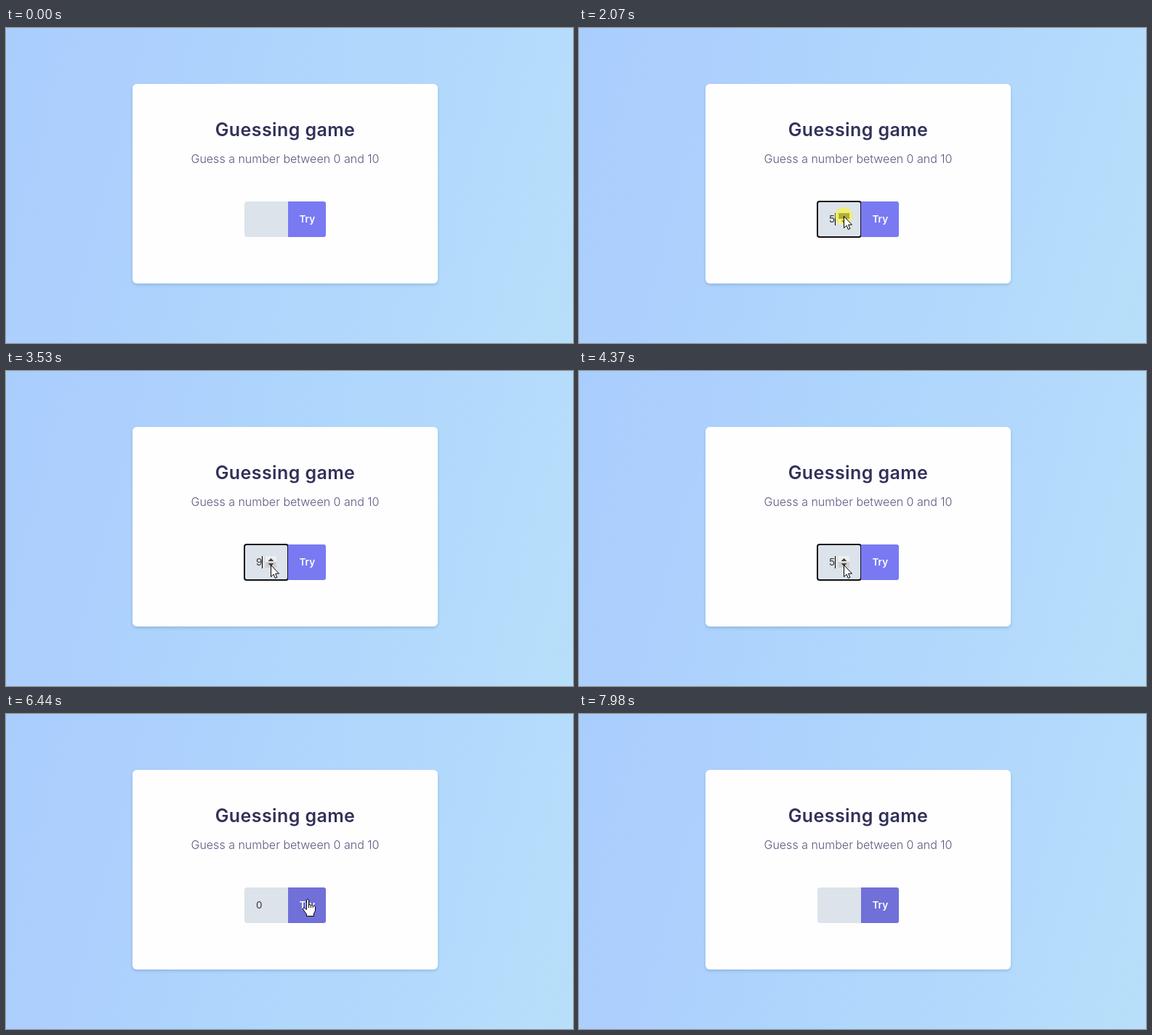
An HTML page with a canvas for the animation above (8000 ms loop, 780 by 434 pixels).

```html
<!DOCTYPE html>
<html lang="en">
<head>
<meta charset="utf-8">
<title>Guessing game</title>
<style>
  html, body { margin: 0; width: 100%; height: 100%; overflow: hidden; }
  canvas { display: block; }
</style>
</head>
<body>
<canvas id="stage" width="780" height="434"></canvas>
<script>
const ctx = document.getElementById('stage').getContext('2d');
const LOOP = 8000;

const INPUT = { x: 328, y: 239, w: 60, h: 49 };
const BUTTON = { x: 388, y: 239, w: 52, h: 49 };
const SPINNER = { x: 357, y: 255, w: 15, h: 16 };
const SPINNER_HIT = { x: 357, y: 256, w: 15, h: 15 };

// Pointer route: time, x, y
const ROUTE = [
  [190, 559, 396], [400, 490, 368], [540, 441, 337], [640, 420, 286],
  [760, 388, 261], [850, 365, 255], [1080, 365, 255], [1180, 364, 259],
  [3020, 364, 259], [3240, 364, 267], [5300, 364, 267], [5380, 370, 265],
  [5450, 370, 265], [5720, 443, 343], [5910, 443, 343], [6090, 428, 305],
  [6210, 416, 275], [6320, 415, 255], [6650, 415, 255], [6900, 491, 311],
  [7010, 491, 297], [7130, 491, 290], [7500, 415, 265], [7890, 415, 265],
  [7891, 421, 100], [7960, 421, 100]
];

const UP = { start: 1240, gap: 190, count: 10 };
const DOWN = { start: 3400, gap: 200, count: 10 };
const BLUR = 5800, SUBMIT = 6550, LAST_CLICK = 7830, PRESS = 110;

const ARROW = new Path2D('M.5 .5V16.5L4.1 13.1L6.4 18.5L8.9 17.4L6.6 12.1H11.5Z');
const HAND = new Path2D('M-1.5 1Q0 -1 1.5 1V8Q3 6.5 4.3 8.5Q6 7.3 7.2 9.3Q9 8.3 10.5 10.5V16L8.5 20V23.5H-1.5V21L-6.5 14Q-7 11.5 -4.5 12L-1.5 14.5Z');
const KNUCKLES = new Path2D('M1.5 8V12M4.3 8.5V12M7.2 9.3V12');
const BEAM = new Path2D('M-3 -7.5H-1L0 -6.5L1 -7.5H3M0 -6.5V6.5M-3 7.5H-1L0 6.5L1 7.5H3');

const inside = (p, r) => !!p && p.x >= r.x && p.x < r.x + r.w && p.y >= r.y && p.y < r.y + r.h;

function pointerAt(t) {
  const next = ROUTE.findIndex(k => k[0] > t);
  if (next < 1) return null;
  const [t0, x0, y0] = ROUTE[next - 1], [t1, x1, y1] = ROUTE[next];
  const f = (t - t0) / (t1 - t0);
  return { x: Math.round(x0 + (x1 - x0) * f), y: Math.round(y0 + (y1 - y0) * f) };
}

function clicks(t, run) {
  const n = Math.floor((t - run.start) / run.gap) + 1;
  return Math.max(0, Math.min(run.count, n));
}

function pressing(t, run) {
  const n = clicks(t, run);
  return n > 0 && t - run.start - (n - 1) * run.gap < PRESS;
}

const pressedAt = (t, at) => t >= at && t < at + PRESS;

// Linear 200 ms colour transition, sampled over the recent past
function hoverAmount(t) {
  let sum = 0;
  for (let i = 0; i < 20; i++) {
    const past = t - i * 10;
    if (past >= LAST_CLICK || inside(pointerAt(past), BUTTON)) sum++;
  }
  return sum / 20;
}

function box(r, radii, fill) {
  ctx.beginPath();
  ctx.roundRect(r.x, r.y, r.w, r.h, radii);
  ctx.fillStyle = fill;
  ctx.fill();
}

function text(str, x, y, font, fill, align = 'center') {
  ctx.font = font + ' Inter, sans-serif';
  ctx.textAlign = align;
  ctx.fillStyle = fill;
  ctx.fillText(str, x, y);
}

function rect(x, y, w, h, fill) {
  ctx.fillStyle = fill;
  ctx.fillRect(x, y, w, h);
}

function drawPage() {
  const bg = ctx.createLinearGradient(-27, 107, 807, 327);
  bg.addColorStop(0, '#a9cefd');
  bg.addColorStop(0.2, '#adcffe');
  bg.addColorStop(0.38, '#add4fc');
  bg.addColorStop(0.75, '#b3dafc');
  bg.addColorStop(1, '#b8dff9');
  rect(0, 0, 780, 434, bg);

  ctx.save();
  ctx.shadowColor = 'rgba(30,60,110,.2)';
  ctx.shadowBlur = 4;
  ctx.shadowOffsetY = 2;
  box({ x: 174, y: 77, w: 420, h: 275 }, 6, '#fefefe');
  ctx.restore();

  ctx.letterSpacing = '0.4px';
  text('Guessing game', 384, 148.5, '600 25px', '#32315a');
  ctx.letterSpacing = '0px';
  text('Guess a number between 0 and 10', 384, 186, '300 16px', '#5d5780');
}

function triangle(x, y, dir) {
  ctx.beginPath();
  ctx.moveTo(x - 4, y);
  ctx.lineTo(x + 4, y);
  ctx.lineTo(x, y - 4 * dir);
  ctx.fillStyle = '#404040';
  ctx.fill();
}

function drawSpinner(p, up, down) {
  const { x, y, w } = SPINNER;
  const over = inside(p, SPINNER_HIT);
  const shade = (hot, pressed) => pressed ? '#666' : hot ? '#cfcfcf' : '#efefef';
  rect(x, y, w, 8, shade(over && p.y < y + 8, up));
  rect(x, y + 8, w, 8, shade(over && p.y >= y + 8, down));
  triangle(x + 7.5, y + 7, 1);
  triangle(x + 7.5, y + 10, -1);
}

function drawInput(t, p, up, down) {
  const focused = t >= UP.start && t < BLUR;
  box(INPUT, [4, 0, 0, 4], '#dce3ea');
  if (focused) {
    ctx.beginPath();
    ctx.roundRect(328, 239, 60, 49, 3);
    ctx.lineWidth = 2;
    ctx.strokeStyle = '#101010';
    ctx.stroke();
  }

  if (t >= UP.start && t < SUBMIT) {
    const value = String(clicks(t, UP) - clicks(t, DOWN));
    const selected = focused && t >= 5310;
    ctx.save();
    ctx.beginPath();
    ctx.rect(344, 250, 13, 28);
    ctx.clip();
    if (selected) rect(344, 255, 9, 17, '#1c66d2');
    text(value, 344, 268, '400 13.5px', selected ? '#fff' : '#333', 'left');
    ctx.restore();
    if (focused && !selected) rect(value.length > 1 ? 356 : 352, 255, 1, 17, '#000');
  }
  if (focused || inside(p, INPUT)) drawSpinner(p, up, down);
}

function drawButton(t) {
  const h = hoverAmount(t);
  const mix = (a, b) => Math.round(a + (b - a) * h);
  box(BUTTON, [0, 3, 3, 0], `rgb(${mix(121, 112)},${mix(122, 112)},${mix(242, 216)})`);
  text('Try', 414.3, 268, '600 13.5px', '#fff');
}

function outline(path) {
  ctx.fillStyle = '#fff';
  ctx.fill(path);
  ctx.stroke(path);
}

function drawPointer(p) {
  ctx.save();
  ctx.translate(p.x, p.y);
  ctx.strokeStyle = '#000';
  ctx.lineWidth = 1;
  if (inside(p, BUTTON)) {
    outline(HAND);
    ctx.stroke(KNUCKLES);
  } else if (inside(p, INPUT) && !inside(p, SPINNER_HIT)) {
    ctx.translate(0.5, 0);
    ctx.stroke(BEAM);
  } else {
    outline(ARROW);
  }
  ctx.restore();
}

function draw(t) {
  const p = pointerAt(t);
  const up = pressing(t, UP), down = pressing(t, DOWN);
  drawPage();
  drawInput(t, p, up, down);
  drawButton(t);
  if (!p) return;
  if (up || down || [BLUR, SUBMIT].some(at => pressedAt(t, at)) || (t >= LAST_CLICK && t < 7890)) {
    ctx.beginPath();
    ctx.arc(p.x, p.y, 12, 0, Math.PI * 2);
    ctx.fillStyle = 'rgba(255,250,0,.5)';
    ctx.fill();
  }
  drawPointer(p);
}

function frame(now) {
  draw(now % LOOP);
  requestAnimationFrame(frame);
}
draw(0);
requestAnimationFrame(frame);
</script>
</body>
</html>
```
